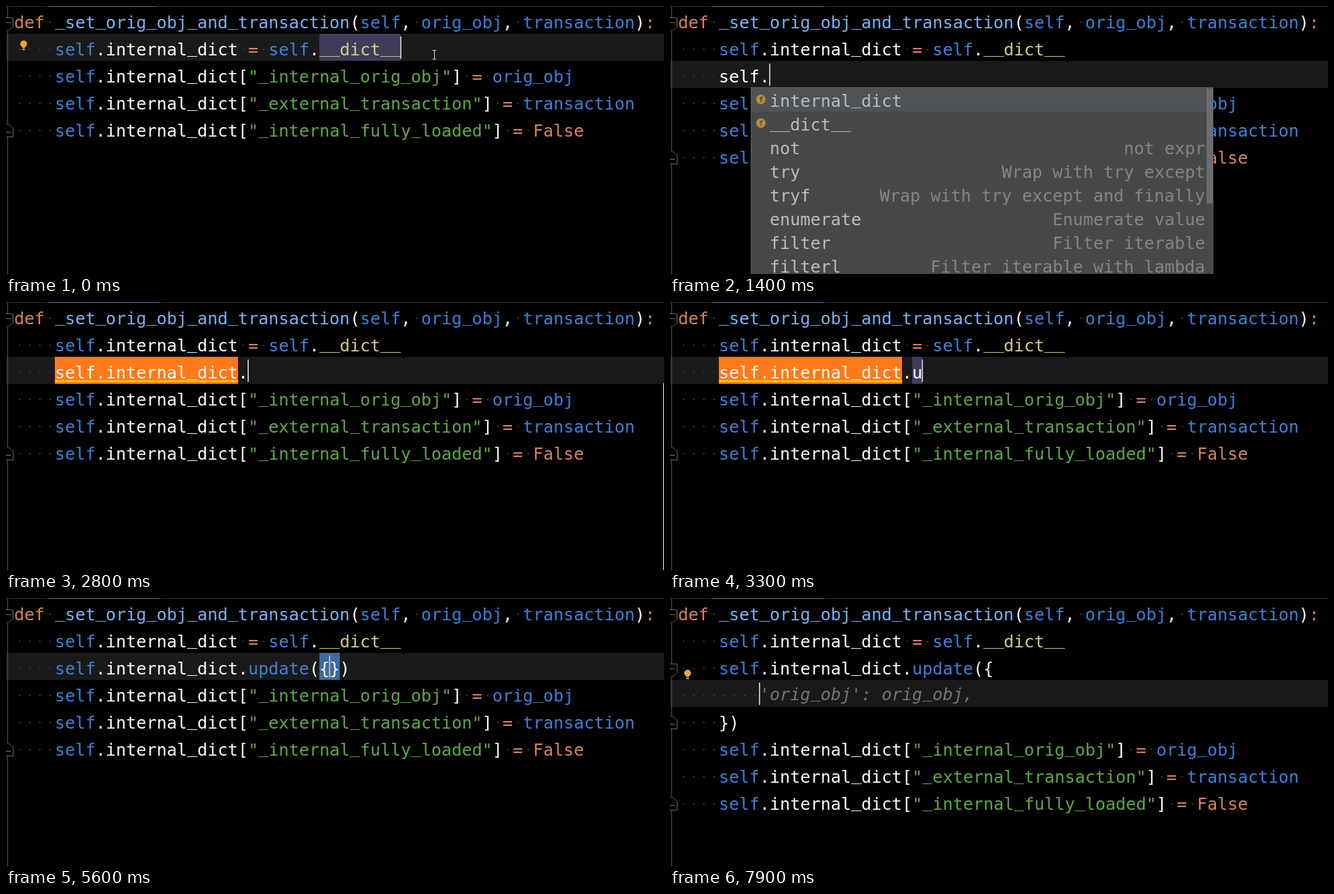
An HTML page with a canvas that plays this animation: 970 px wide and 396 px high, repeating every 8000 ms.

```html
<!DOCTYPE html>
<html lang="en">
<head>
<meta charset="utf-8">
<title>Code completion</title>
<style>
html, body { margin: 0; width: 100%; height: 100%; overflow: hidden; background: #000; }
canvas { display: block; }
</style>
</head>
<body>
<canvas id="stage" width="970" height="396"></canvas>
<script>
const ctx = document.getElementById('stage').getContext('2d');
const LOOP = 8000, CHAR = 15, LEFT = 12, ROW = 40, ITEM = 35;
const FONT = '24.92px "DejaVu Sans Mono", "Noto Sans Mono", monospace';
const BLUE = '#3f80d8', ORANGE = '#d8835f', GREEN = '#5faa46', WHITE = '#fff';
const WORD_BG = '#3f3d5a', BRACE_BG = '#3a6ca0', BAND = '#1a1a1a';
const COLORS = {
  def: ORANGE, False: ORANGE, '=': ORANGE, ':': ORANGE,
  self: BLUE, orig_obj: BLUE, transaction: BLUE, update: BLUE,
  _set_orig_obj_and_transaction: '#7fb2f5', __dict__: '#d8cb82'
};

const HEAD = [
  'def _set_orig_obj_and_transaction(self, orig_obj, transaction):',
  '    self.internal_dict = self.__dict__'
];
const TAIL = [
  '    self.internal_dict["_internal_orig_obj"] = orig_obj',
  '    self.internal_dict["_external_transaction"] = transaction',
  '    self.internal_dict["_internal_fully_loaded"] = False'
];
const DICT = 'self.internal_dict';
// [start time, typed text, characters right of the caret]
const TYPING = [
  [400, '', 0], [1000, 's', 0], [1100, 'se', 0], [1200, 'sel', 0], [1300, 'self', 0],
  [1400, 'self.', 0], [2200, DICT, 0], [2800, DICT + '.', 0], [3300, DICT + '.u', 0],
  [3500, DICT + '.up', 0], [3600, DICT + '.upd', 0], [3700, DICT + '.upda', 0],
  [3800, DICT + '.update', 0], [4700, DICT + '.update()', 1], [5500, DICT + '.update({})', 2]
];

const MODULES = 'stat server samba scipy socket sched secrets selectors select'.split(' ')
  .map(name => [/^(samba|scipy)$/.test(name) ? 'dot' : 'file', name]);
const MEMBERS = [
  ['f', 'internal_dict'], ['f', '__dict__'], ['', 'not', 'not expr'],
  ['', 'try', 'Wrap with try except'], ['', 'tryf', 'Wrap with try except and finally'],
  ['', 'enumerate', 'Enumerate value'], ['', 'filter', 'Filter iterable'],
  ['', 'filterl', 'Filter iterable with lambda']
];
const METHODS = ['update(self, m)', 'get(self, key)', 'items(self)', 'keys(self)', 'values(self)',
  'pop(self, key)', 'copy(self)', 'clear(self)'].map(name => ['m', name, 'dict']);

const colX = col => LEFT + col * CHAR;
const rowY = row => 1 + row * ROW;
const within = (t, a, b) => t >= a && t < b;

function rect(color, x, y, w, h) {
  ctx.fillStyle = color;
  ctx.fillRect(x, y, w, h);
}

function disc(color, x, y, r) {
  ctx.fillStyle = color;
  ctx.beginPath();
  ctx.arc(x, y, r, 0, 7);
  ctx.fill();
}

function path(points, color, width, fill) {
  ctx.beginPath();
  points.forEach(([x, y]) => ctx.lineTo(x, y));
  if (fill) {
    ctx.fillStyle = fill;
    ctx.fill();
  }
  ctx.strokeStyle = color;
  ctx.lineWidth = width;
  ctx.stroke();
}

// Underscores sit just below the baseline, higher than the font puts them.
function write(text, x, y, color, font = FONT) {
  ctx.font = font;
  ctx.fillStyle = color;
  ctx.fillText(text.replace(/_/g, ' '), x, y);
  ctx.fillText(text.replace(/[^_]/g, ' '), x, y - 4);
}

function code(line, row, plain) {
  for (const { 0: token, index } of line.matchAll(/"[^"]*"|\w+|./g)) {
    const x = colX(index), y = rowY(row);
    if (token === ' ') rect('#3d3d3d', x + 7, y + 22, 2, 2);
    else write(token, x, y + 32, plain ? WHITE : token[0] === '"' ? GREEN : COLORS[token] || WHITE);
  }
}

function ghost(text, col, row) {
  write(text, colX(col), rowY(row) + 30, '#747474', 'italic ' + FONT);
}

function mark(color, col, row, length) {
  rect(color, colX(col), rowY(row), length * CHAR, ROW);
}

function fold(row, up) {
  const y = rowY(row) + (up ? 32.5 : 16.5), d = up ? -1 : 1;
  path([[-1, y], [10.5, y], [10.5, y + 13 * d], [2.5, y + 20 * d], [-1, y + 17 * d]], '#666', 1, '#000');
  rect('#777', 0, y + 7 * d - 0.5, 7, 1);
}

function bulb(y) {
  disc('#f0a530', 26, y + 5, 5);
  rect('#f0a530', 24, y + 8, 4, 3);
  rect('#a8a8a8', 24, y + 12, 4, 2);
}

function warning() {
  mark('#ff7a1a', 4, 2, DICT.length);
  const wave = Array.from({ length: 136 }, (_, i) => [72 + i * 2, 116 + i % 2 * 2]);
  path(wave, '#ffe000', 1.5);
}

function icon(kind, x, y) {
  if (kind === 'dot') disc('#aaa', x + 15, y - 2, 2);
  if (kind === 'file') {
    rect('#939a9f', x + 10, y - 7, 11, 13);
    disc('#4389bd', x + 18, y + 2, 4.5);
  }
  if (kind === 'f' || kind === 'm') {
    disc(kind === 'f' ? '#b58a3c' : '#c07078', x + 15, y - 2, 7);
    write(kind, x + 12, y + 2, '#3a3020', '11px "DejaVu Sans Mono", monospace');
  }
}

function popup(x, items, prefix, thumb) {
  const w = 682, shown = items.slice(0, 8), h = shown.length * ITEM + 2;
  if (!shown.length) return;
  rect('#5b5e60', x, 120, w, h);
  rect('#46484a', x + 1, 121, w - 2, h - 2);
  rect('#4f5356', x + 1, 121, w - 2, ITEM);
  shown.forEach(([kind, label, hint], i) => {
    const y = 121 + i * ITEM;
    icon(kind, x, y + 19);
    write(prefix, x + 28, y + 28, '#589df6');
    write(label.slice(prefix.length), x + 28 + prefix.length * CHAR, y + 28, '#bbb');
    if (hint) write(hint, x + 670 - hint.length * CHAR, y + 28, '#858585');
  });
  if (thumb) rect('#6b6d6f', x + w - 10, 122, 9, thumb);
}

function draw(t) {
  const [, typed, after] = TYPING.findLast(step => t >= step[0]) || [0, '', 0];
  const split = t >= 6500;
  const middle = t < 400 ? [] : split
    ? ['    ' + DICT + '.update({', '        ', '    })']
    : ['    ' + typed];
  const lines = [...HEAD, ...middle, ...TAIL];
  const caretRow = t < 400 ? 1 : split ? 3 : 2;
  const caretCol = t < 400 ? 38 : split ? 8 : 4 + typed.length - after;
  const warned = within(t, 2600, 4400);

  rect('#000', 0, 0, 970, 396);
  rect(BAND, 0, rowY(caretRow), 970, ROW);
  rect('#2d2d2d', 0, 0, 970, 1);
  rect('#3c78b4', 63, 0, t < 1400 ? 160 : 163, 1);
  rect('#565656', 2, 1, 1, 395);

  if (t < 500) mark(WORD_BG, 30, 1, 8);
  if (within(t, 2300, 2800)) [1, 2, 3, 4, 5].forEach(row => mark(WORD_BG, 9, row, 13));
  if (warned) warning();
  if (within(t, 3300, 4000)) mark(WORD_BG, 23, 2, typed.length - 19);
  if (within(t, 4800, 5500)) mark(BRACE_BG, 29, 2, 1);
  if (within(t, 5500, 6500)) mark(BRACE_BG, 30, 2, 2);

  const hintOpen = within(t, 4800, 5500);
  lines.forEach((line, row) => {
    const fresh = row === 2 && (within(t, 400, 2300) || warned);
    code(hintOpen && row === 2 ? line.slice(0, -1) : line, row, fresh);
  });

  if (within(t, 800, 1000)) ghost('self.orig_obj = orig_obj', 4, 2);
  if (within(t, 4000, 4700)) ghost('(orig_obj.__dict__)', 29, 2);
  if (hintOpen) ghost("{'orig_obj': orig_obj, 'transaction': transaction})", 30, 2);
  if (t >= 6800) ghost("'orig_obj': orig_obj,", 8, 3);

  fold(0);
  fold(t < 600 ? 4 : t < 6600 ? 5 : 7, true);
  if (t >= 6800) {
    fold(2);
    fold(4, true);
  }
  if (t < 400) bulb(51);
  if (within(t, 5500, 5600)) bulb(91);
  if (t >= 7400) bulb(106);

  if (!within(t, 7400, 7900)) rect('#b8b8b8', colX(caretCol) - 1, rowY(caretRow) + 4, 2, 33);

  if (within(t, 1000, 1400)) {
    const found = MODULES.filter(item => item[1].startsWith(typed));
    popup(44, found, typed, found.length > 8 && 26);
  }
  if (within(t, 1400, 2200)) popup(119, MEMBERS, '', 170);
  // edge of the next popup just before it opens
  if (within(t, 2800, 2900)) rect(WHITE, 969, 120, 1, 276);
  if (within(t, 2900, 3300)) popup(329, METHODS, '', 60);

  if (t < 400) {
    rect('#ddd', 631, 66, 1, 12);
    rect('#ddd', 629, 65, 5, 1);
    rect('#ddd', 629, 78, 5, 1);
  }
}

const start = performance.now();
function tick() {
  draw((performance.now() - start) % LOOP);
  requestAnimationFrame(tick);
}
tick();
</script>
</body>
</html>
```
